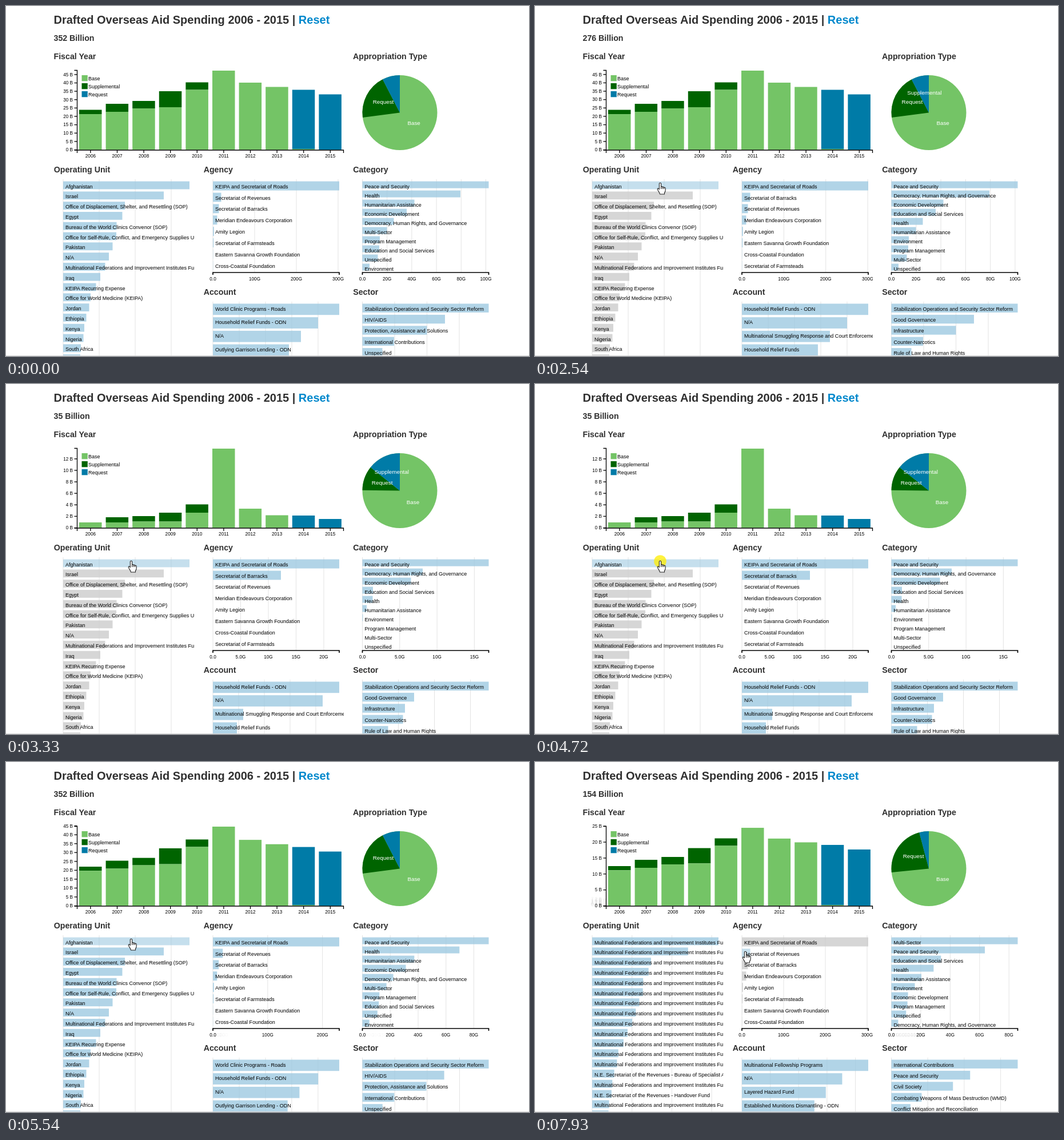
Recreate the animation shown at these times as an HTML page. Size 915 by 612 pixels, loop 8 s.

```html
<!DOCTYPE html>
<html lang="en">
<head>
<meta charset="utf-8">
<title>Spending dashboard</title>
<style>
html, body { margin: 0; width: 100%; height: 100%; overflow: hidden; background: #fff; }
svg { display: block; width: 915px; height: 612px; font-family: "Liberation Sans", Arial, sans-serif; }
.title { font: bold 20px "Liberation Sans", Arial, sans-serif; fill: #303030; }
.head { font: bold 14.2px "Liberation Sans", Arial, sans-serif; fill: #303030; }
.link { fill: #0088cc; }
.row { font-size: 9.03px; }
.tick { font-size: 8.2px; }
.slice { font-size: 9.85px; fill: #fff; text-anchor: middle; }
.mid { text-anchor: middle; }
.end { text-anchor: end; }
.grid { stroke: #e3e3e3; }
.axis { stroke: #000; stroke-width: 1.3; fill: none; }
</style>
</head>
<body>
<svg viewBox="0 0 915 612">
  <defs>
    <clipPath id="left"><rect x="84" y="296" width="245.3" height="316"/></clipPath>
    <clipPath id="centre"><rect x="345" y="296" width="246" height="316"/></clipPath>
    <clipPath id="right"><rect x="607" y="296" width="246" height="316"/></clipPath>
    <clipPath id="top"><rect x="84" y="104" width="510" height="170"/></clipPath>
  </defs>
  <g id="scene"></g>
</svg>
<script>
const LOOP = 8000;
const GREEN = '#74c466', DARK = '#006400', BLUE = '#007ba7';
const scene = document.getElementById('scene');

// Data views: 0 everything, 1 first unit selected, 2 second agency selected
const clicks = [
  { press: 2310, at: 2490, begin: 2506, from: 0, to: 1 },
  { press: 4720, at: 4890, begin: 4930, from: 1, to: 0 },
  { press: 7540, at: 7760, begin: 7761, from: 0, to: 2 }
];
const billions = [352, 35, 2];

const pick = (list, order) => [...order].map(i => list[i]);

const group = 'Multinational Federations and Improvement Institutes Fund';
const units = ['Afghanistan', 'Israel', 'Office of Displacement, Shelter, and Resettling (SOP)', 'Egypt',
  'Bureau of the World Clinics Convenor (SOP)', 'Office for Self-Rule, Conflict, and Emergency Supplies Unit',
  'Pakistan', 'N/A', group, 'Iraq', 'KEIPA Recurring Expense', 'Office for World Medicine (KEIPA)',
  'Jordan', 'Ethiopia', 'Kenya', 'Nigeria', 'South Africa', ''];
const groupUnits = units.map((u, i) =>
  i === 13 ? 'N.E. Secretariat of the Revenues - Bureau of Specialist Aid' :
  i === 15 ? 'N.E. Secretariat of the Revenues - Handover Fund' : group);

const agencies = ['KEIPA and Secretariat of Roads', 'Secretariat of Revenues', 'Secretariat of Barracks',
  'Meridian Endeavours Corporation', 'Amity Legion', 'Secretariat of Farmsteads',
  'Eastern Savanna Growth Foundation', 'Cross-Coastal Foundation'];

const categories = ['Peace and Security', 'Health', 'Humanitarian Assistance', 'Economic Development',
  'Democracy, Human Rights, and Governance', 'Multi-Sector', 'Program Management',
  'Education and Social Services', 'Unspecified', 'Environment'];

const accounts = [
  ['World Clinic Programs - Roads', 'Household Relief Funds - ODN', 'N/A', 'Outlying Garrison Lending - ODN'],
  ['Household Relief Funds - ODN', 'N/A', 'Multinational Smuggling Response and Court Enforcement - ODN',
    'Household Relief Funds'],
  ['Multinational Fellowship Programs', 'N/A', 'Layered Hazard Fund', 'Established Munitions Dismantling - ODN']
];

const sectors = [
  ['Stabilization Operations and Security Sector Reform', 'HIV/AIDS', 'Protection, Assistance and Solutions',
    'International Contributions', 'Unspecified'],
  ['Stabilization Operations and Security Sector Reform', 'Good Governance', 'Infrastructure',
    'Counter-Narcotics', 'Rule of Law and Human Rights'],
  ['International Contributions', 'Peace and Security', 'Civil Society',
    'Combating Weapons of Mass Destruction (WMD)', 'Conflict Mitigation and Reconciliation']
];

const unitW = [221, 176, 108, 103.5, 93.5, 93, 86.5, 80, 73.5, 65, 57.5, 48, 45.5, 40.5, 37, 35.5, 31, 30];
const agencyW = [221, 14.5, 10.5, 7.5, 1.8, 1.2, .3, .3];

// k: pixels per unit, step: tick spacing, both per view
const charts = [
  { title: 'Operating Unit', clip: 'left', x: 100, y: 306.6, step: 17.8, bottom: 612,
    names: [units, units, groupUnits], widths: [unitW, unitW, [221]],
    scale: { k: [63, 63, 207], step: [1, 1, 1] }, chosen: [-1, 0, -1] },
  { title: 'Agency', clip: 'centre', x: 362, y: 306.6, step: 19.9, bottom: 466, axis: true,
    names: [agencies, pick(agencies, '02134675'), agencies], widths: [agencyW, [221, 119], agencyW],
    scale: { k: [.73, 9.7, .73], step: [100, 5, 100] }, chosen: [-1, -1, 1] },
  { title: 'Category', clip: 'right', x: 623.5, y: 306.6, step: 16, bottom: 466, axis: true,
    names: [categories, pick(categories, '0437129658'), pick(categories, '5071293684')],
    widths: [[221, 171.5, 91, 77.5, 55, 43, 30.5, 29.5, 27, 12.5], [221, 105.5, 85, 18.5, 18, 7.5, 1], [221]],
    scale: { k: [2.16, 13.06, 11], step: [20, 5, 2] } },
  { title: 'Account', clip: 'centre', x: 362, y: 520.5, step: 23.7, bottom: 612,
    names: accounts, widths: [[221, 184, 154, 133], [221, 192, 53, 42], [221]],
    scale: { k: [46, 45, 124], step: [1, 1, 1] } },
  { title: 'Sector', clip: 'right', x: 623.5, y: 520.5, step: 19.4, bottom: 612,
    names: sectors, widths: [[221, 144.5, 113, 55.5, 35], [221, 90.5, 74.5, 71, 45], [221]],
    scale: { k: [56.5, 63, 211], step: [1, 1, 1] } }
];

const years = {
  base: [
    [62.5, 66.5, 72.5, 74.5, 105, 138.5, 117.5, 110, 1.5, 0],
    [9.5, 9.5, 11, 11, 26.5, 138.5, 33.5, 22, 0, 0],
    [56, 66, 72, 69, 105, 94, 120, 132, 0, 0]],
  total: [
    [70, 80.5, 85.5, 102.5, 118, 138.5, 117.5, 110, 105, 97],
    [9.5, 18.5, 20.5, 26.5, 41, 138.5, 33.5, 22, 21.5, 15.5],
    [59, 80, 85, 69, 118, 94, 120, 132, 138, 130]],
  scale: { k: [2.925, 10.05, 59.7], step: [5, 2, .2] }
};

// Ends of the first two slices, as turns
const pie = [[.729, .924], [.752, .857], [.74, 1]];

const track = [[670, 752, 618], [1450, 226, 296], [1520, 226, 296], [1870, 219, 310], [6020, 219, 310],
  [6790, 351, 336], [6878, 351, 336], [6890, 357.5, 336], [7360, 368, 332]];

const clamp = v => Math.max(0, Math.min(1, v));
const mix = (a, b, p) => a + (b - a) * p;
const cubic = t => t < .5 ? 4 * t ** 3 : 1 - 4 * (1 - t) ** 3;
const outIn = t => t < .5 ? (1 - (1 - 2 * t) ** 2) / 2 : (1 + (2 * t - 1) ** 2) / 2;
const smooth = t => t * t * (3 - 2 * t);

const text = (x, y, cls, s, extra = '') => `<text x="${x}" y="${y}" class="${cls}" ${extra}>${s}</text>`;
const rect = (x, y, w, h, fill, extra = '') =>
  w > 0 && h > 0 ? `<rect x="${x}" y="${y}" width="${w}" height="${h}" fill="${fill}" ${extra}/>` : '';
const line = (x1, y1, x2, y2, cls, o = 1) =>
  `<line x1="${x1}" y1="${y1}" x2="${x2}" y2="${y2}" class="${cls}" opacity="${o}"/>`;
const path = (d, attrs) => `<path d="${d}" ${attrs}/>`;

function stateAt(t) {
  const c = clicks.filter(c => t >= c.at).pop();
  if (!c) return { from: 0, to: 0, p: 1, pieP: 1, numP: 1 };
  const part = ms => clamp((t - c.begin) / ms);
  return { from: c.from, to: c.to, p: cubic(part(750)), pieP: cubic(part(350)), numP: outIn(part(250)) };
}

// Ticks of the old view fade out while those of the new view fade in
function ticks(scale, span, s) {
  const found = new Map();
  const k = mix(scale.k[s.from], scale.k[s.to], s.p);
  const add = (view, o) => {
    const step = scale.step[view];
    for (let i = 0; i * step <= span / scale.k[view]; i++) {
      const v = +(i * step).toFixed(1);
      found.set(v, (found.get(v) || 0) + o);
    }
  };
  add(s.from, 1 - s.p);
  add(s.to, s.p);
  return [...found].map(([v, o]) => ({ v, o: Math.min(1, o), pos: v * k }));
}

function cursorAt(t) {
  if (t < track[0][0]) return null;
  const i = track.findIndex(q => q[0] > t);
  if (i < 0) return { x: 368, y: 332 };
  const [t0, x0, y0] = track[i - 1], [t1, x1, y1] = track[i];
  const p = smooth((t - t0) / (t1 - t0));
  return { x: mix(x0, x1, p), y: mix(y0, y1, p) };
}

function yearChart(s) {
  let out = '<g clip-path="url(#top)">';
  for (let i = 0; i < 10; i++) {
    const x = 128 + 46.6 * i;
    const [base, total] = [years.base, years.total].map(v => mix(v[s.from][i], v[s.to][i], s.p));
    out += rect(x, 251.5 - total, 39.5, total - base, i > 7 ? BLUE : DARK)
      + rect(x, 251.5 - base, 39.5, base, GREEN)
      + line(x + 19.9, 252, x + 19.9, 257, 'axis')
      + text(x + 19.9, 265.4, 'tick mid', 2006 + i);
  }
  for (const { v, o, pos } of ticks(years.scale, 139.5, s)) {
    const y = 251.5 - pos;
    out += line(119.5, y, 124.5, y, 'axis', o) + text(117, y + 2.8, 'tick end', v + ' B', `opacity="${o}"`);
  }
  out += path('M119.5 112.5H124.5V252H119.5M124.5 257V252H590.5V257', 'class="axis"') + '</g>';
  [['Base', GREEN], ['Supplemental', DARK], ['Request', BLUE]].forEach(([name, fill], i) => {
    out += rect(132.5, 121 + 14 * i, 10.3, 10.3, fill) + text(144, 129.8 + 14 * i, 'row', name);
  });
  return out;
}

function pieChart(s) {
  const cx = 689, cy = 186.5, r = 65.5;
  const point = (turn, d) => [cx + d * Math.sin(turn * 2 * Math.PI), cy - d * Math.cos(turn * 2 * Math.PI)];
  const ends = view => [0, ...pie[view], 1];
  const cuts = ends(s.from).map((a, i) => mix(a, ends(s.to)[i], s.pieP));
  const goal = ends(s.to);
  let out = `<circle cx="${cx}" cy="${cy}" r="${r}" fill="${GREEN}"/>`, labels = '';
  ['Base', 'Request', 'Supplemental'].forEach((name, i) => {
    const a = cuts[i], b = cuts[i + 1];
    if (i) out += path(`M${cx} ${cy}L${point(a, r)}A${r} ${r} 0 0 1 ${point(b, r)}Z`,
      `fill="${i === 1 ? DARK : BLUE}"`);
    const [x, y] = point((a + b) / 2, r / 2);
    if (goal[i + 1] - goal[i] > .0796) labels += text(x, y, 'slice', name);
  });
  return out + labels;
}

function rowChart(c, s, cur) {
  const top = c.y - 3.6, h = c.step - 4, chosen = c.chosen ? c.chosen[s.to] : -1;
  let out = text(c.x - 16.3, c.y - 15.8, 'head', c.title) + `<g clip-path="url(#${c.clip})">`;
  for (const { v, o, pos } of ticks(c.scale, 221.5, s)) {
    const x = c.x + pos;
    out += line(x, top, x, c.bottom, 'grid', o);
    if (c.axis) out += text(x, 479.5, 'tick mid', v ? (v < 10 ? v.toFixed(1) : v) + 'G' : '0.0', `opacity="${o}"`);
  }
  if (c.axis) out += path(`M${c.x} 470V466H${c.x + 221}V470`, 'class="axis" style="stroke-width:1.7"');
  c.names[s.to].forEach((name, i) => {
    const y = c.y + c.step * i;
    const w = mix(c.widths[s.from][i] || 0, c.widths[s.to][i] || 0, s.p);
    const hover = cur && cur.x >= c.x && cur.x <= c.x + w && cur.y >= y && cur.y <= y + h;
    if (hover) cur.hand = true;
    const fill = chosen >= 0 && chosen !== i ? '#ccc' : '#9ecae1';
    out += rect(c.x, y, w, h, fill, `fill-opacity="${hover ? .6 : .8}"`) + text(c.x + 4, y + 12, 'row', name);
  });
  return out + '</g>';
}

function pointer(t, cur) {
  if (!cur) return '';
  const pressed = clicks.some(c => t >= c.press && t < c.at);
  const shape = cur.hand
    ? path('M-1.6 10.5V.8A1.6 1.6 0 0 1 1.6 .8V6Q3.2 5 4.2 6.5Q5.8 5.9 6.6 7.3Q9 6.8 9.2 9V12Q9.2 15 7.5 16.5V19H-.5'
      + 'Q-1.2 16-3.8 12.6Q-5.8 9-3.6 8.8ZM1.6 6V10M4.2 6.5V10M6.6 7.3V10',
      'fill="#fff" stroke="#222" stroke-width="1.1" stroke-linejoin="round"')
    : path('M0 0V22.5L5 17.8L9.3 27L13 25.2L9 16.3H16Z', 'fill="#000" stroke="#fff" stroke-width="1"');
  return `<g transform="translate(${cur.x} ${cur.y})">`
    + (pressed ? '<circle r="10.8" fill="#ffee00" fill-opacity=".75"/>' : '') + shape + '</g>';
}

function draw(t) {
  const s = stateAt(t), cur = cursorAt(t);
  const amount = Math.round(mix(billions[s.from], billions[s.to], s.numP));
  scene.innerHTML =
    text(83.5, 31, 'title', 'Drafted Overseas Aid Spending 2006 - 2015 | <tspan class="link">Reset</tspan>')
    + text(83.5, 61.2, 'head', amount + ' Billion')
    + text(83.5, 93.4, 'head', 'Fiscal Year')
    + text(607, 93.4, 'head', 'Appropriation Type')
    + yearChart(s) + pieChart(s)
    + charts.map(c => rowChart(c, s, cur)).join('')
    + rect(0, 611, 915, 1, '#dcdcdc')
    + pointer(t, cur);
}

function frame() {
  draw(performance.now() % LOOP);
  requestAnimationFrame(frame);
}
frame();
</script>
</body>
</html>
```
